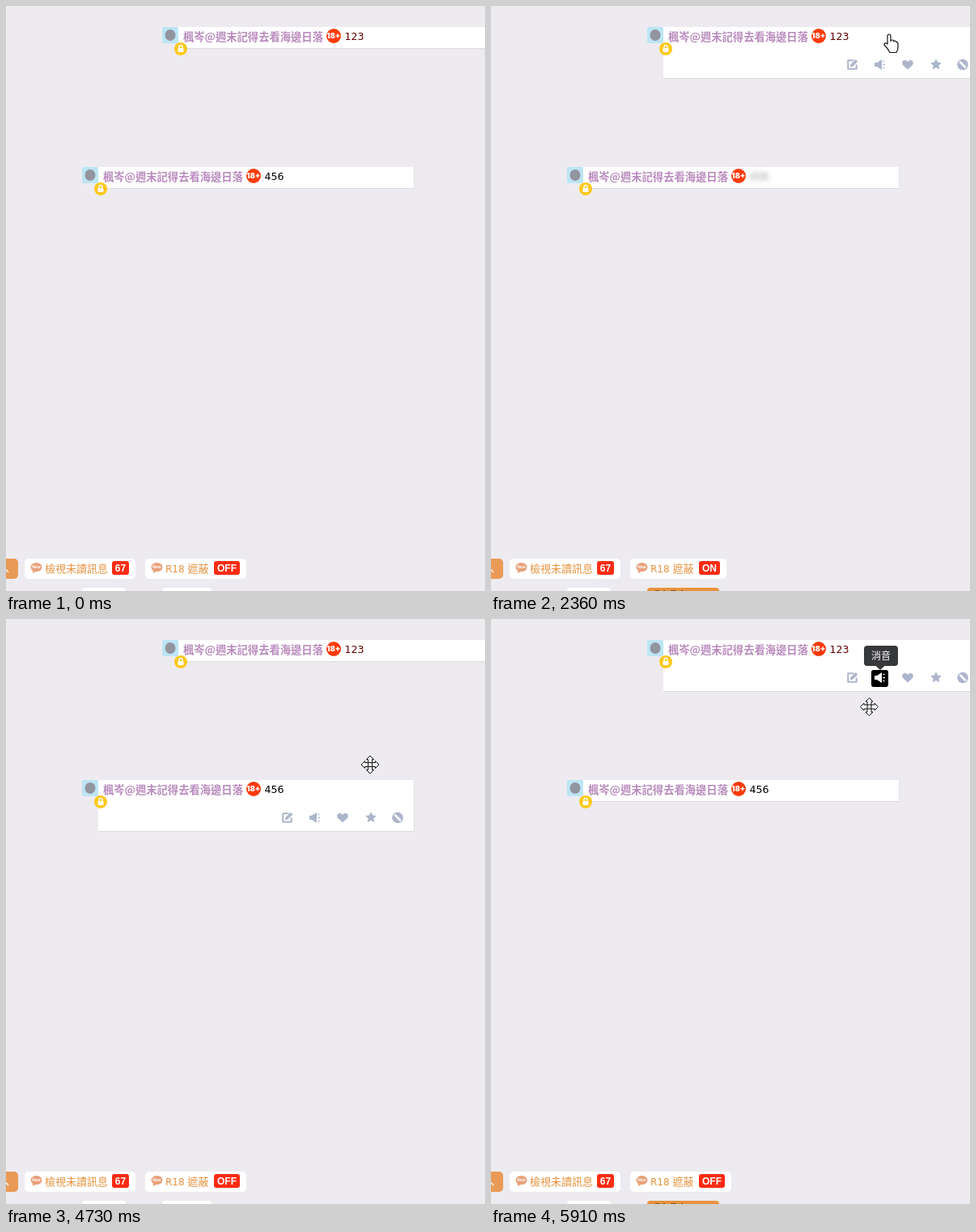
An HTML page for the animation above (6000 ms loop, 592 px wide and 723 px high).

```html
<!DOCTYPE html>
<html lang="zh-Hant">
<head>
<meta charset="utf-8">
<style>
html, body { margin: 0; width: 100%; height: 100%; overflow: hidden; background: #edebf0; }
svg { display: block; width: 592px; height: 723px; }
text { font: 13px "Noto Sans CJK TC", "Noto Sans CJK", sans-serif; }
.name { font-size: 13.3px; font-weight: 700; fill: #b98bbd; }
.num { font: 12.6px "DejaVu Sans", sans-serif; }
.latin { font: 12px "DejaVu Sans", sans-serif; }
.age { font: 900 9.5px Inter, sans-serif; fill: #fff; text-anchor: middle; }
.badge { font: 700 12px "Liberation Sans", sans-serif; fill: #fff; text-anchor: middle; }
.new { font: 700 5px "Liberation Sans", sans-serif; text-anchor: middle; }
.tip { font-size: 12px; fill: #fff; text-anchor: middle; }
.blur { filter: blur(3px); opacity: .8; }
.blur .num { fill: #777; }
</style>
</head>
<body>
<svg id="stage" viewBox="0 0 592 723"></svg>
<script>
const LOOP = 6000, ORANGE = '#e8923e';
const stage = document.getElementById('stage');

// Pointer track: time, x, y, area under the pointer
const track = [
  [640, 244, 697, 'button'], [820, 248, 695, 'button'], [1000, 248, 695, 'button'],
  [1090, 300, 640], [1180, 372, 535], [1270, 438, 430], [1360, 473.5, 367.5],
  [1640, 514, 282], [1730, 500, 210, 'low'],
  [2090, 515, 144.5], [2270, 501, 60, 'top'], [2360, 492, 35, 'top'], [2450, 491, 37, 'top'],
  [2820, 479, 118], [2910, 442, 270], [3000, 395, 430], [3090, 350, 560], [3180, 313.5, 650.5],
  [3270, 268, 694, 'button'], [3360, 248, 698, 'button'],
  [3450, 247, 699, 'button'], [3540, 247, 699, 'button'],
  [3630, 270, 640], [3730, 318, 520], [3820, 365, 405], [3910, 400, 318], [4000, 421, 262],
  [4090, 430, 240], [4180, 433.5, 230.5], [4270, 436, 218, 'low'], [4360, 440, 211, 'low'], [4450, 442, 208, 'low'],
  [4730, 450, 180], [4820, 458, 128], [4910, 464, 76, 'top'], [5000, 468, 47, 'top'],
  [5180, 464, 120], [5270, 458.5, 194.5], [5360, 456, 212, 'low'], [5450, 462, 207, 'low'],
  [5540, 471, 140], [5640, 479, 60, 'top'], [5730, 484, 14.5],
  [5820, 480, 72, 'mute'], [5910, 467.5, 108.5, 'mute']
];

const rect = (x, y, w, h, fill, r = 0) =>
  `<rect x="${x}" y="${y}" width="${w}" height="${h}" rx="${r}" fill="${fill}"/>`;
const disc = (x, y, r, fill) => `<circle cx="${x}" cy="${y}" r="${r}" fill="${fill}"/>`;
const text = (x, y, s, cls = '', fill = '') =>
  `<text x="${x}" y="${y}" class="${cls}"${fill && ` fill="${fill}"`}>${s}</text>`;
const at = (x, y, body, attrs = '') => `<g transform="translate(${x} ${y})" ${attrs}>${body}</g>`;

const starPoints = Array.from({length: 10}, (_, i) => {
  const a = i * Math.PI / 5, r = i % 2 ? 3.6 : 7.2;
  return [r * Math.sin(a), -r * Math.cos(a)].map(v => v.toFixed(1));
}).join(' ');

const pen = `<path d="M2-5.2H-5.2V5.2H5.2V0" fill="none" stroke="currentColor" stroke-width="2" stroke-linejoin="round"/>
  <path d="M-2.5 2.7L-2-.3L4.2-6.5L6.8-4L.6 2.2Z" fill="currentColor"/>`;
const speaker = `<path d="M-6.5-2.5H-3.5L2.5-6.5V6.5L-3.5 2.5H-6.5Z" fill="currentColor"/>
  <path d="M4-3.5L6-4.5M4 0H6.5M4 3.5L6 4.5" stroke="currentColor" stroke-width="1.3"/>`;
const heart = '<path d="M0 6L-6 .5C-9-4-3.5-8 0-3.5C3.5-8 9-4 6 .5Z" fill="currentColor"/>';
const star = `<polygon points="${starPoints}" fill="currentColor"/>`;
const blocked = disc(0, 0, 6.8, 'currentColor') +
  '<path d="M-3-3L3 3" stroke="#fff" stroke-width="2.6" stroke-linecap="round"/>';

function toolbar(mute) {
  const icons = [[446.5, pen], [480.5, speaker], [515, heart], [550, star], [583, blocked]];
  return icons.map(([x, icon]) => {
    const active = mute && icon === speaker;
    return (active ? rect(470, 63, 21, 21, '#000', 3) : '') +
      at(x, 72.5, icon, `color="${active ? '#fff' : '#adb5cc'}"`);
  }).join('');
}

function tooltip() {
  return rect(461, 33, 42, 25, '#37383b', 4) +
    '<path d="M475.5 58H486.5L481 63Z" fill="#37383b"/>' + text(482, 50, '消音', 'tip');
}

function post(dx, dy, num, color, tabWidth, {open, hover, censor, mute}) {
  const h = open ? 63 : 26;
  const hidden = censor && !hover ? 'class="blur"' : '';
  const tab = hover
    ? rect(193, 719, 89, 12, ORANGE, 4) +
      '<path d="M203 722.5H208M213 722.5H215M222 722.5H229M235 722.5H237" stroke="#8a5420"/>'
    : rect(193, 719, tabWidth, 12, '#fff', 4);
  return at(dx, dy,
    rect(213, 26, 390.6, h + 1, '#dddbe1') + rect(213, 26, 390, h, '#fff') +
    rect(193, 26, 20, 20, '#bce5f4', 2) +
    '<ellipse cx="203" cy="36" rx="6.5" ry="7" fill="#92949f"/>' +
    disc(216, 53, 8, '#fcc81c') + rect(212.5, 52, 7, 5, '#fff', 1) +
    '<path d="M214 52V50.5a2 2 0 0 1 4 0V52" fill="none" stroke="#fff" stroke-width="1.4"/>' +
    text(219, 42.5, '楓岑@週末記得去看海邊日落', 'name') +
    disc(405, 37, 9, '#fe3a08') + text(404.8, 40.4, '18+', 'age') +
    `<g ${hidden}>${text(418.6, 42, num, 'num', color)}${open ? toolbar(mute) : ''}</g>` +
    (mute ? tooltip() : '')) + at(dx, 0, tab);
}

function button(x, w, label, value, badgeX, badgeW, hover) {
  const ink = hover ? '#fff' : ORANGE;
  const mark = hover ? '#fff' : '#e8a179';
  return rect(x, 683, w, 25, hover ? ORANGE : '#fff', 5) +
    `<ellipse cx="${x + 14.5}" cy="693.5" rx="7" ry="5.5" fill="${mark}"/>` +
    `<path d="M${x + 10} 697L${x + 10} 701L${x + 15} 698Z" fill="${mark}"/>` +
    text(x + 14.5, 695.3, 'New', 'new', hover ? ORANGE : '#fff') +
    text(x + 25, 699.5, label, '', ink) +
    rect(badgeX, 686, badgeW, 17, '#fd2c13', 3) +
    text(badgeX + badgeW / 2, 699, value, 'badge');
}

const outline = 'fill="#fff" stroke="#111" stroke-linejoin="round"';
const hand = `<path ${outline} stroke-width="1.2" d="M-2 12V2.5Q-2 0 0 0T2 2.5V8.5Q2 7 4 7T6 9Q6 8 7.5 8T9 10
  Q9 9.2 10 9.7T11 12V16Q11 19 9 22.5H1Q-1 18-6 13Q-6 10.5-4 11Z"/>`;
const mover = [0, 90, 180, 270].map(a =>
  `<path transform="rotate(${a})" ${outline} d="M0-11L4.5-6.5H2.5V-2.5H-2.5V-6.5H-4.5Z"/>`).join('');

function draw(t) {
  const past = track.filter(k => k[0] <= t);
  const [, x, y, area] = past.at(-1) || [];
  const mute = area === 'mute';
  const visited = past.map(k => k[3] === 'mute' ? 'top' : k[3]).filter(a => a === 'top' || a === 'low').at(-1);
  const censor = t >= 1000 && t < 3450;

  const top = {open: visited === 'top', hover: area === 'top' || mute, censor, mute};
  const low = {open: visited === 'low', hover: area === 'low', censor};
  const onItem = area && !(mute && y > 89);

  stage.innerHTML = post(0, 0, '123', '#650000', 61, top) +
    post(-99, 173, '456', '#000', 54, low) +
    rect(-10, 683, 25, 25, '#e99a56', 5) +
    '<path d="M0 696.5L3 700" stroke="#fff" stroke-width="1.3"/>' +
    button(23, 137, '檢視未讀訊息', '67', 131, 21) +
    button(172, censor ? 119 : 125, '<tspan class="latin">R18 </tspan>遮蔽',
      censor ? 'ON' : 'OFF', 257, censor ? 26 : 32, area === 'button') +
    (past.length ? at(x, y, onItem ? hand : mover) : '');
  return past.length;
}

let shown = -1;
const start = performance.now();
function tick() {
  const t = (performance.now() - start) % LOOP;
  const step = track.filter(k => k[0] <= t).length;
  if (step !== shown) shown = draw(t);
  requestAnimationFrame(tick);
}
tick();
</script>
</body>
</html>
```
